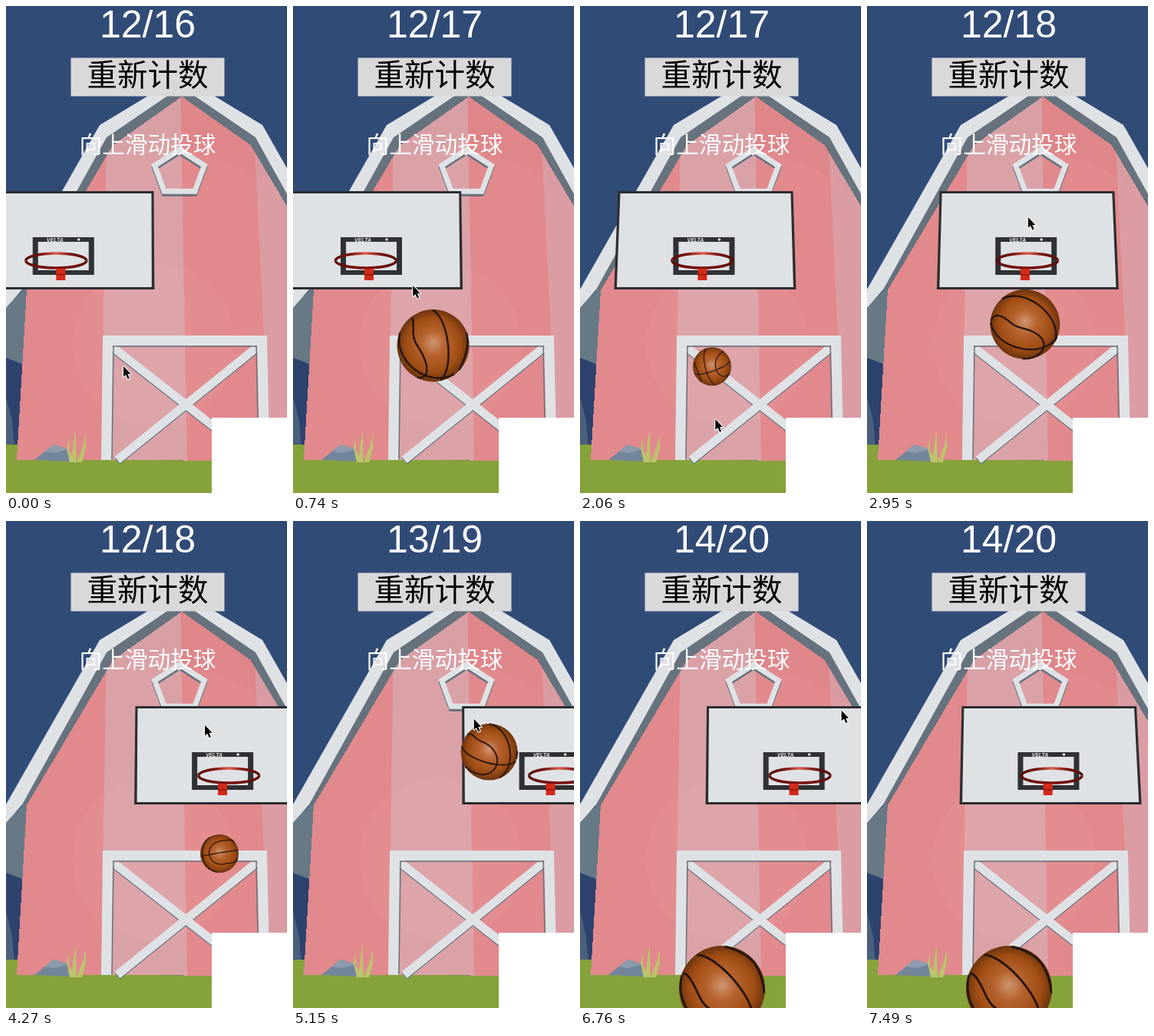
An HTML page with a canvas for the animation above (7590 ms loop, 366x634 px).

```html
<!DOCTYPE html>
<html lang="zh">
<head>
<meta charset="utf-8">
<style>
html, body { margin: 0; width: 100%; height: 100%; overflow: hidden; background: #314b77; }
canvas { display: block; }
</style>
</head>
<body>
<canvas width="366" height="634"></canvas>
<script>
const screen2d = document.querySelector('canvas').getContext('2d');
const backdrop = new OffscreenCanvas(366, 634);
let g = backdrop.getContext('2d');

const LOOP = 7590, STEP = 146.8, TAU = Math.PI * 2;
const WHITE = '#dfe2e5', SHADE = '#66727d';
const CJK = '"Noto Sans CJK SC", "Noto Sans CJK", sans-serif';

function trace(points) {
  g.beginPath();
  for (const [x, y] of points) g.lineTo(x, y);
}
function poly(color, ...points) {
  trace(points);
  g.fillStyle = color;
  g.fill();
}
function line(color, width, ...points) {
  trace(points);
  g.strokeStyle = color;
  g.lineWidth = width;
  g.stroke();
}
function box(color, x, y, w, h) {
  g.fillStyle = color;
  g.fillRect(x, y, w, h);
}
function disc(color, x, y, r) {
  g.beginPath();
  g.arc(x, y, r, 0, TAU);
  g.fillStyle = color;
  g.fill();
}
function label(text, x, y, font, color) {
  g.font = font;
  g.fillStyle = color;
  g.textAlign = 'center';
  g.fillText(text, x, y);
}

// symmetric barn outline: half widths and heights at apex, shoulder and eave
function gable(axis, apex, [sx, sy], [ex, ey]) {
  return [[axis - ex, ey], [axis - sx, sy], [axis, apex], [axis + sx, sy], [axis + ex, ey]];
}

function drawBarn() {
  poly(WHITE, [0, 368], [22, 368], [0, 393]);
  poly(WHITE, ...gable(228, 91, [106, 155], [228, 369]));
  poly(SHADE, ...gable(228, 105, [97, 171], [208, 371]));
  g.save();
  trace([...gable(229, 118, [89.5, 181], [202, 370]), [442, 592], [14, 591]]);
  g.clip();
  box('#df868a', 0, 100, 366, 500);
  poly('#d8a0a5', [132, 100], [227, 100], [236, 592], [124, 592]);
  poly('#d99ba1', [320, 100], [366, 100], [366, 592], [344, 592]);
  disc('rgba(255,190,190,.05)', 192, 440, 255);
  disc('rgba(255,190,190,.08)', 192, 440, 106);
  g.restore();

  const pentagon = y => [0, 1, 2, 3, 4, 5, 6].map(i =>
    [226 + 34 * Math.sin(i * TAU / 5), y - 30 * Math.cos(i * TAU / 5)]);
  line(SHADE, 7, ...pentagon(220));
  line(WHITE, 7, ...pentagon(217));

  for (const [color, drop] of [[SHADE, 1.5], [WHITE, 0]]) {
    line(color, 11, [140, 445 + drop], [326, 591 + drop]);
    line(color, 11, [326, 445 + drop], [145, 591 + drop]);
  }
  line(SHADE, 1.5, [138, 590], [140, 443], [326, 443], [329, 590]);
  line(WHITE, 13, [130.5, 591], [132.5, 435.5], [333.5, 435.5], [337, 591]);
}

function drawBackdrop() {
  box('#314b77', 0, 0, 366, 634);
  poly('#667985', [0, 390], [28, 365], [22, 466], [0, 458]);
  poly('#2d426d', [0, 458], [22, 468], [14, 590], [0, 590]);
  poly('#4a607d', [0, 508], [8, 540], [11, 575], [0, 575]);
  poly('#86a23b', [0, 571], [16, 571], [16, 590], [366, 592], [366, 634], [0, 634]);
  drawBarn();

  poly('#73859b', [37, 591], [62, 571], [82, 577], [84, 593]);
  poly('#8c9bad', [50, 580], [62, 571], [82, 577], [64, 582]);
  for (const [x, lean, height] of [[86, -4, 31], [88, 3, 43], [95, 9, 38]])
    poly('#bcc46b', [x - 3, 594], [x + lean - 3, 594 - height * 0.6], [x + lean, 594 - height], [x + lean, 594 - height / 2], [x + 4, 594]);

  box('#d9d9d9', 84.5, 67.5, 200, 50);
  label('重新计数', 184.5, 104, '39.5px ' + CJK, '#000');
}

// aim: where the pointer ends the swipe; ready: when it starts back down
const idle = { x: 185, aim: [153, 469], launch: 0 };
const throws = [
  { spawn: 140, ready: 0, launch: 605, x: 172, fall: 445, tilt: 1.3, aim: [157, 365], score: '12/17' },
  { spawn: 2200, ready: 1790, launch: 2783, x: 278, fall: 355, tilt: 0.5, aim: [204, 276], score: '12/18' },
  { spawn: 4405, ready: 4300, launch: 4840, x: 347, fall: 400, tilt: 0.8, aim: [216, 260], score: '13/19' },
  { spawn: 6450, ready: Infinity, launch: Infinity, x: 185, fall: 0, tilt: 0.85, score: '14/20' }
];

// the hoop swings right, then turns back
const hoopAt = t => 356 - 345 * Math.sin(0.000177 * Math.abs(t - 5483));

function ballAt({ launch, x, fall, tilt }, t) {
  const s = Math.max(0, t - launch) / 1000, u = Math.min(1, s / 0.7);
  return {
    x: 185 + (x - 185) * u,
    y: u < 1 ? 217 + 392 * (1 - u) ** 2.7 : 217 + fall * (s - 0.7) ** 2,
    r: 25 + 31 * (1 - u) ** 1.66,
    spin: s * 3, tilt, falling: u === 1
  };
}

const clamp = u => Math.min(1, Math.max(0, u));
const smooth = u => u * u * (3 - 2 * u);
const mix = (a, b, u) => a.map((v, i) => v + (b[i] - v) * u);

// pointer: swipe up to the aim, drift along the throw, return for the next grab
function mouseAt(t) {
  const n = throws.findLastIndex(s => s.ready <= t);
  const shot = throws[n], last = throws[n - 1] || idle;
  const drift = ({ x, aim, launch }, time) => {
    const s = Math.max(0, time - launch) / 1000;
    return [aim[0] + (x - 185) * 0.4 * s, aim[1] - 7 * s];
  };
  const grab = mix(drift(last, shot.ready), [185, 600], smooth(clamp((t - shot.ready) / 400)));
  return mix(grab, drift(shot, t), smooth(clamp((t - shot.launch) / 130 + 1)));
}

const turn = (a, b, w) => [a * Math.cos(w) - b * Math.sin(w), a * Math.sin(w) + b * Math.cos(w)];
const bulge = a => 0.65 - 0.15 * Math.cos(2 * a);
const ring = (a, h) => [Math.sqrt(1 - h * h) * Math.cos(a), h, Math.sqrt(1 - h * h) * Math.sin(a)];
const seams = [
  a => [Math.cos(a), Math.sin(a), 0],
  a => ring(a, 0),
  a => ring(a, bulge(a)),
  a => ring(a, -bulge(a))
];

function drawBall({ x, y, r, spin, tilt }) {
  const skin = g.createRadialGradient(x, y - r * 0.1, 0, x, y, r);
  skin.addColorStop(0, '#cf9570');
  skin.addColorStop(0.35, '#b5622e');
  skin.addColorStop(0.75, '#a04d14');
  skin.addColorStop(1, '#6b340f');
  disc(skin, x, y, r);
  g.strokeStyle = '#24130c';
  g.lineWidth = Math.max(1.2, r * 0.05);
  g.beginPath();
  for (const seam of seams) {
    let seen = false;
    for (let a = 0; a <= TAU + 0.05; a += 0.1) {
      let [px, py, pz] = seam(a);
      [py, pz] = turn(py, pz, 0.35);
      [px, py] = turn(px, py, tilt);
      [py, pz] = turn(py, pz, spin);
      const method = seen ? 'lineTo' : 'moveTo';
      seen = pz > 0.15;
      if (seen) g[method](x + px * r, y + py * r);
    }
  }
  g.stroke();
}

function drawBoard(x) {
  const d = x - 161;
  const left = x - 110 - d * 0.03, right = x + 118 - d * 0.035;
  poly('#2c2e30', [left, 241], [right, 241], [x + 122, 369], [x - 115, 369]);
  poly(WHITE, [left + 3, 244], [right - 3, 244], [x + 118.5, 366], [x - 111.5, 366]);
  const sx = x - 38 - d * 0.016;
  box('#2f3134', sx, 301, 80, 49);
  box(WHITE, sx + 7, 307, 66, 37);
  label('VELTA', sx + 29, 306.5, 'italic bold 7px "Liberation Sans", sans-serif', '#e6e6e6');
  disc('#e6e6e6', sx + 60, 304, 1.8);
}

function drawRim(x, front) {
  const cx = x + (x - 161) * 0.067;
  const paint = g.createLinearGradient(cx - 41, 0, cx + 41, 0);
  ['#5a0d0a', '#701009', front ? '#7c140e' : '#e0604c', '#701009', '#5a0d0a']
    .forEach((color, i) => paint.addColorStop(i / 4, color));
  g.beginPath();
  g.ellipse(cx, 331.5, 39.5, 9.5, 0, front ? 0 : Math.PI, front ? Math.PI : TAU);
  g.strokeStyle = paint;
  g.lineWidth = 3.5;
  g.stroke();
  if (front) {
    box('#d42a1a', x - 6, 342, 12, 15);
    box('#8f170e', x - 6, 349, 12, 1.5);
  }
}

function drawMouse(t) {
  g.save();
  g.translate(...mouseAt(t));
  g.scale(0.92, 0.92);
  g.lineJoin = 'round';
  const arrow = [[0, 0], [0, 15], [3.5, 12], [6, 18], [8.5, 17], [6, 11], [10.5, 11], [0, 0]];
  line('#fff', 2.5, ...arrow);
  poly('#000', ...arrow);
  g.restore();
}

function draw(now) {
  const t = Math.min(51, Math.floor(now % LOOP / STEP)) * 147;
  const x = hoopAt(t);
  const shot = throws.findLast(s => s.spawn <= t);
  const ball = shot && ballAt(shot, t);
  g.drawImage(backdrop, 0, 0);
  drawBoard(x);
  drawRim(x, false);
  if (ball && ball.falling) drawBall(ball);
  drawRim(x, true);
  if (ball && !ball.falling) drawBall(ball);
  label(shot ? shot.score : '12/16', 184.5, 41, '50px "Liberation Sans", Arial, sans-serif', '#fff');
  label('向上滑动投球', 184.5, 190.7, '29.7px ' + CJK, '#fff');
  box('#fff', 268, 536, 98, 98);
  if (t < 7050) drawMouse(t);
}

drawBackdrop();
g = screen2d;
const start = performance.now();
function frame() {
  draw(performance.now() - start);
  requestAnimationFrame(frame);
}
frame();
</script>
</body>
</html>
```
